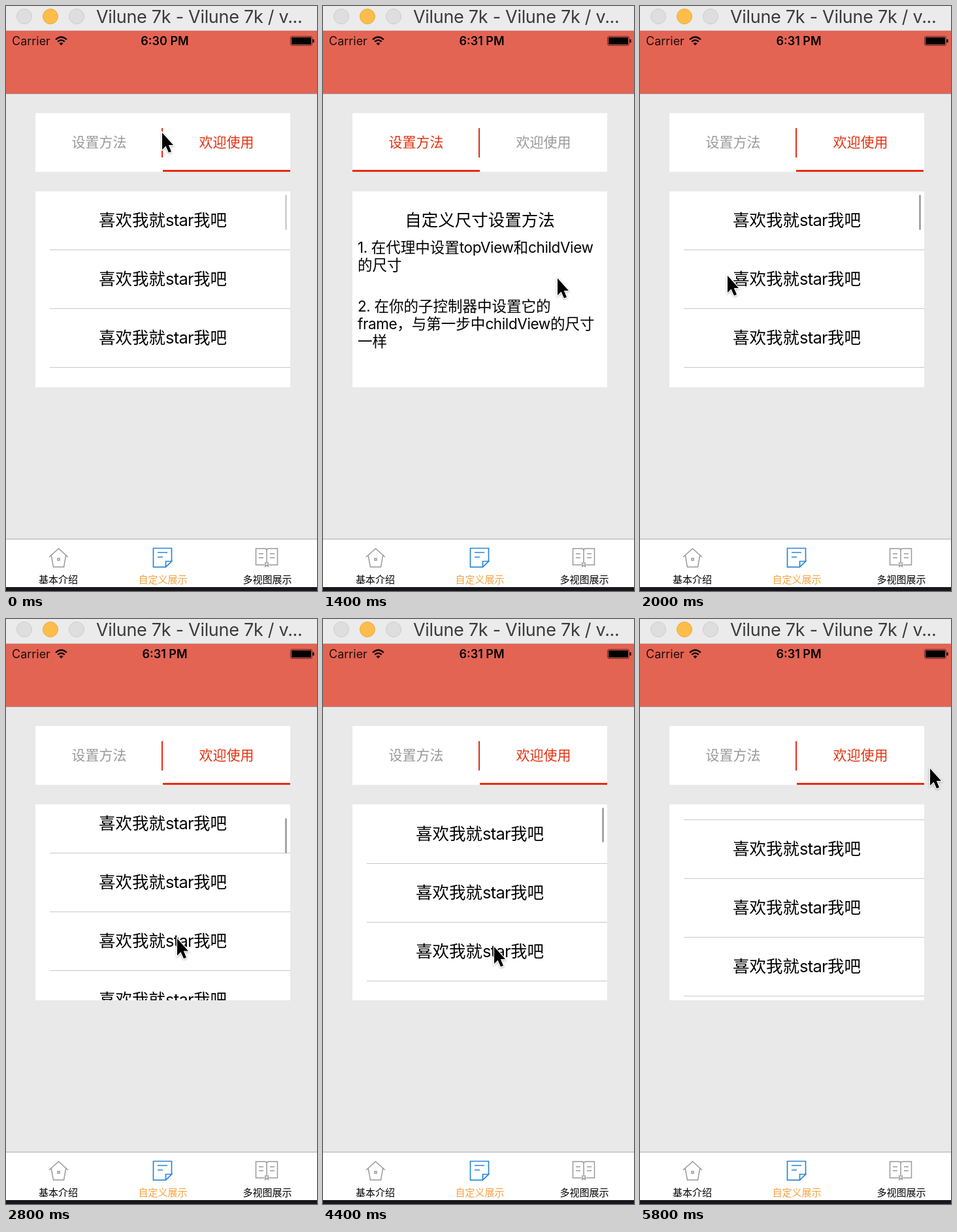
These frames come from a looping animation (476 by 896 pixels, 6000 ms). An HTML page:

```html
<!DOCTYPE html>
<html lang="zh-CN">
<head>
<meta charset="utf-8">
<title>Tab demo</title>
<style>
html, body { margin: 0; width: 100%; height: 100%; overflow: hidden; background: #e9e9e9; }
body { font-family: Inter, "Noto Sans CJK SC", "Noto Sans CJK", sans-serif; color: #000; }
#stage { position: absolute; left: 0; top: 0; width: 476px; height: 896px; overflow: hidden; background: #e9e9e9; }
#stage div, svg { position: absolute; white-space: nowrap; }
i { font-style: normal; letter-spacing: -.03em; }

.window { left: 0; top: 0; width: 476px; height: 37px; background: #ebebeb; border-bottom: 1px solid #d2cfcd; }
.window div { left: 138px; top: 0; line-height: 34px; font-size: 27px; letter-spacing: -.3px; color: #3b3b3b; }
.nav { left: 0; top: 38px; width: 476px; height: 96px; background: #e46454; border-bottom: 1px solid #a89c9a; }
.carrier { left: 9px; top: 5px; line-height: 22px; font-size: 18px; color: #1b0d0b; }
#clock { left: 143px; top: 5px; width: 200px; text-align: center; line-height: 22px; font-size: 18px; font-weight: 600; }

.tabs { left: 45px; top: 164px; width: 390px; height: 90px; background: #fff; }
.tab { top: 0; width: 195px; line-height: 90px; text-align: center; font-size: 21px; color: #999; }
.tab.on { color: #e5300f; }
.split { left: 193px; top: 23px; width: 2px; height: 45px; background: #e92b10; }
#underline { left: 0; top: 87px; width: 195px; height: 3px; background: #e92b10; }

.scene { left: 45px; top: 284px; width: 390px; height: 300px; perspective: 1050px; }
.face { left: 0; top: 0; width: 390px; height: 300px; overflow: hidden; background: #fff; backface-visibility: hidden; }
#rows { left: 0; top: 0; width: 390px; }
.row { left: 0; width: 390px; height: 90px; line-height: 87px; text-align: center; font-size: 25.5px; }
.row::after { content: ""; position: absolute; left: 22px; right: 0; top: 89px; height: 1px; background: #c8c7cc; }
#bar { left: 382px; top: 5px; width: 3px; height: 54px; border-radius: 1.5px; background: #a6a6a6; }
.head { left: 0; top: 24px; width: 390px; line-height: 40px; text-align: center; font-size: 25.5px; }
.note { left: 8px; line-height: 27px; font-size: 22.5px; }
.note i { letter-spacing: -.017em; }

.bottom { left: 0; top: 816px; width: 476px; height: 73px; background: #fff; border-top: 1px solid #adadad; }
.bottom div { top: 51px; width: 120px; line-height: 22px; text-align: center; font-size: 15px; font-weight: 500; }
.edge { left: 0; top: 890px; width: 476px; height: 6px; background: #17161d; }
#art { left: 0; top: 0; }
#cursor { left: 0; top: 0; overflow: visible; filter: drop-shadow(0 1px 1.5px rgba(0,0,0,.3)); }
</style>
</head>
<body>
<div id="stage">
  <div class="window"><div>Vilune 7k - Vilune 7k / v...</div></div>
  <div class="nav">
    <div class="carrier">Carrier</div>
    <div id="clock">6:30 PM</div>
  </div>

  <div class="tabs">
    <div class="tab" id="tabA" style="left:0">设置方法</div>
    <div class="tab" id="tabB" style="left:195px">欢迎使用</div>
    <div class="split"></div>
    <div id="underline"></div>
  </div>

  <div class="scene">
    <div class="face" id="list"><div id="rows"></div><div id="bar"></div></div>
    <div class="face" id="guide">
      <div class="head">自定义尺寸设置方法</div>
      <div class="note" style="top:72px"><i>1. </i>在代理中设置<i>topView</i>和<i>childView</i><br>的尺寸</div>
      <div class="note" style="top:162px"><i>2. </i>在你的子控制器中设置它的<br><i>frame</i>，与第一步中<i>childView</i>的尺寸<br>一样</div>
    </div>
  </div>

  <div class="bottom">
    <div style="left:20px">基本介绍</div>
    <div style="left:180px;color:#f7a03c">自定义展示</div>
    <div style="left:340px">多视图展示</div>
  </div>
  <div class="edge"></div>

  <svg id="art" width="476" height="896" fill="none">
    <g stroke="#cbcbcb"><circle cx="28" cy="16" r="11.5" fill="#dedede"/><circle cx="108" cy="16" r="11.5" fill="#dedede"/></g>
    <circle cx="68" cy="16" r="11.5" fill="#fdbd4a" stroke="#e9a93f"/>
    <g stroke="#120807" stroke-width="2.4">
      <path d="M76 51.5Q84.5 43.5 93 51.5M79.2 54.7Q84.5 49.8 89.8 54.7"/>
      <path d="M84.5 60.5L81.4 57.3Q84.5 54.6 87.6 57.3Z" fill="#120807" stroke="none"/>
    </g>
    <rect x="435.5" y="46.5" width="33" height="14" rx="2.5" stroke="#5c2620"/>
    <rect x="437" y="48" width="30" height="11" rx="1" fill="#000"/>
    <path d="M470.5 51V56" stroke="#000" stroke-width="2"/>
    <g stroke="#999" stroke-width="1.5">
      <path d="M66 844L80.5 831L95 844M69.3 841.5L72.5 859.3H88.5L91.7 841.5"/>
      <rect x="79" y="846" width="3" height="3"/>
      <path d="M399 833V854M395.5 856H382.5V831H396Q399 831 399 834Q399 831 402 831H415.5V856H402.5M387 839H394M387 845H394M404 839H411M404 845H411M396.8 852V858.5L399 856.5L401.2 858.5V852"/>
    </g>
    <path d="M253.5 850V830.5H225.5V859.3H244.5L253.5 850.5H244.5V859M232 837H247M232 844H240" stroke="#2785d8" stroke-width="1.7"/>
  </svg>

  <svg id="cursor" width="24" height="36">
    <path d="M1 2V28L6.5 22.5L11 32.5L15 31L10.8 21H18Z" fill="#000" stroke="#fff" stroke-width="2.4" paint-order="stroke"/>
  </svg>
</div>

<script>
const LOOP = 6000, STEP = 200, TURN = 500;
const $ = id => document.getElementById(id);

// Keys are [time, value, ...]
const pointer = [
  [0, 238, 192], [400, 178, 198], [600, 178, 198], [1200, 358, 415], [1400, 358, 415],
  [1800, 133, 411], [2000, 133, 411], [2400, 261, 545], [2600, 261, 545], [3000, 261, 430],
  [3400, 261, 545], [3600, 261, 545], [4400, 261, 500], [4600, 261, 500], [5000, 261, 400],
  [5200, 261, 400], [5600, 443, 227]
];
const scroll = [
  [2600, 0], [3000, 210], [3200, 262], [3400, 277], [3600, 277], [4000, 40], [4200, -8],
  [4400, -1], [4600, 0], [5000, 200], [5200, 290], [5400, 328], [5600, 336]
];
const barFade = [[0, .5], [400, 0], [1900, 0], [2000, 1], [5400, 1], [5800, 0]];

$('rows').innerHTML = Array.from({ length: 18 }, (_, i) =>
  `<div class="row" style="top:${i * 90}px">喜欢我就<i>star</i>我吧</div>`).join('');

const clamp = u => Math.min(1, Math.max(0, u));
const ease = u => u * u * (3 - 2 * u);
const turn = (t, start) => ease(clamp((t - start) / TURN));

function track(keys, t) {
  const next = keys.findIndex(k => k[0] > t);
  if (next < 0) return keys[keys.length - 1].slice(1);
  if (next === 0) return keys[0].slice(1);
  const a = keys[next - 1], b = keys[next];
  const u = (t - a[0]) / (b[0] - a[0]);
  return a.slice(1).map((v, i) => v + (b[i + 1] - v) * u);
}

function pose(face, angle) {
  const s = face.style, tilt = Math.abs(angle);
  s.visibility = tilt < 89.9 ? 'visible' : 'hidden';
  s.transform = tilt ? `translateZ(-195px) rotateY(${angle}deg) translateZ(195px)` : 'none';
  s.filter = tilt ? `brightness(${1 - tilt * .0074})` : 'none';
}

function draw(t) {
  const first = turn(t, 340), second = turn(t, 1480);
  if (t < 1400) {
    pose($('list'), -90 * first);
    pose($('guide'), 90 - 90 * first);
  } else {
    pose($('guide'), -90 * second);
    pose($('list'), 90 - 90 * second);
  }

  // The underline trails the cube slightly
  const x = 195 * (1 - turn(t, 380) + turn(t, 1520));
  $('underline').style.transform = `translateX(${Math.round(x)}px)`;
  const guideOn = t >= 380 && t < 1520;
  $('tabA').classList.toggle('on', guideOn);
  $('tabB').classList.toggle('on', !guideOn);

  const [offset] = track(scroll, t);
  $('rows').style.transform = `translateY(${Math.round(-offset)}px)`;
  $('bar').style.transform = `translateY(${Math.round(Math.max(0, offset) * .155)}px)`;
  $('bar').style.height = 54 + Math.min(0, offset) + 'px';
  $('bar').style.opacity = track(barFade, t)[0];

  const [cx, cy] = track(pointer, t);
  $('cursor').style.transform = `translate(${cx}px, ${cy}px)`;
  $('clock').textContent = t < 1000 ? '6:30 PM' : '6:31 PM';
}

const start = performance.now();
function tick() {
  const t = (performance.now() - start) % LOOP;
  draw(Math.floor(t / STEP) * STEP);
  requestAnimationFrame(tick);
}
tick();
</script>
</body>
</html>
```
